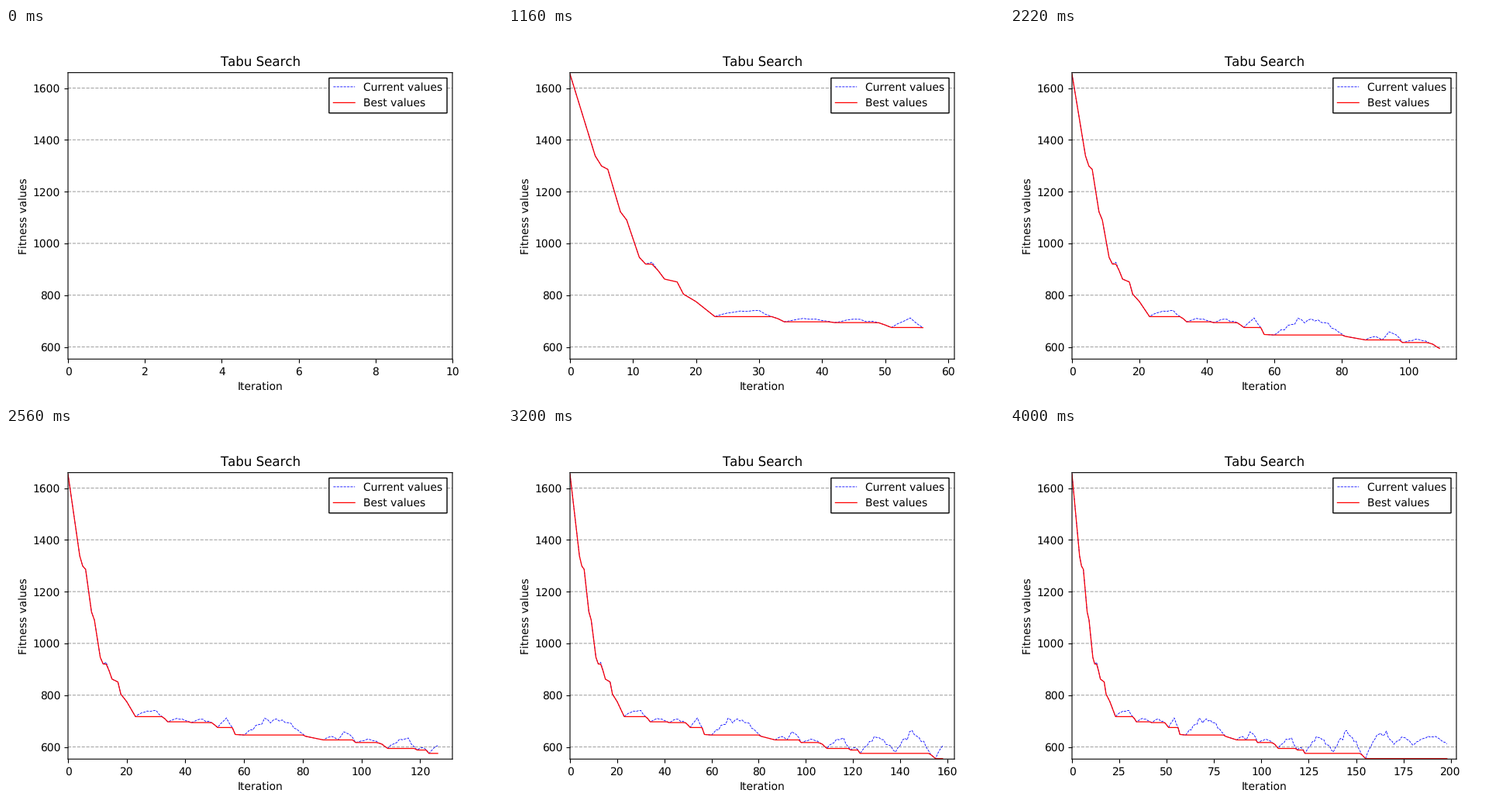
These frames come from a looping animation (640x480 px, 4.02 s). A matplotlib script:

```python
import numpy as np
import matplotlib.pyplot as plt
from matplotlib.animation import FuncAnimation

FRAMES, STEP_MS, HOLD = 201, 20, 2

# Steep opening: bends of the curve (iteration, fitness)
descent = [(0, 1654), (4, 1338), (5, 1299), (6, 1286), (8, 1122), (9, 1090),
           (11, 946), (12, 920), (13, 927), (15, 862), (17, 851), (18, 804),
           (20, 775)]

# Local optima: (iteration, fitness, climb before the next optimum)
optima = [(23, 717, 34), (34, 697, 14), (42, 694, 22), (51, 675, 44),
          (57, 648, 0), (60, 646, 60), (81, 641, 0), (87, 627, 12),
          (92, 627, 33), (98, 617, 20), (109, 594, 42), (119, 588, 16),
          (123, 575, 58), (138, 580, 74), (153, 570, 0), (155, 555, 72),
          (170, 610, 28), (180, 607, 30), (198, 612, 0)]


def search_path(iters):
    """Fall from optimum to optimum, with a noisy climb in between."""
    rng = np.random.default_rng(7)
    xs, ys = zip(*descent, *(o[:2] for o in optima))
    path = np.interp(iters, xs, ys)
    for (start, _, climb), (end, *_) in zip(optima, optima[1:]):
        arch = np.sin(np.pi * np.linspace(0, 1, end - start + 1))
        noise = rng.normal(0, 0.14, arch.size)
        path[start:end + 1] += climb * arch * (1 + noise)
    return path


iters = np.arange(FRAMES - HOLD)
current = search_path(iters)
best = np.minimum.accumulate(current)

plt.rcParams.update({
    "font.family": "DejaVu Sans",
    "text.hinting": "none",
    "text.kerning_factor": 6,
    "path.snap": False,
})
fig, ax = plt.subplots(figsize=(6.4, 4.8), dpi=100)
ax.set(title="Tabu Search", xlabel="Iteration", ylabel="Fitness values",
       xlim=(0, 10), ylim=(553, 1659.6))
ax.grid(axis="y", color="gray", alpha=0.7, linestyle="--", linewidth=0.8)
current_line, = ax.plot([], [], "b--", linewidth=0.6, label="Current values")
best_line, = ax.plot([], [], "r-", linewidth=0.9, label="Best values")
ax.legend(loc="upper right", fancybox=False, edgecolor="black", framealpha=1)


def update(frame):
    last = max(0, frame - HOLD)
    shown = slice(0, last + 1)
    current_line.set_data(iters[shown], current[shown])
    best_line.set_data(iters[shown], best[shown])
    ax.set_xlim(0, max(10, last + 5))
    return current_line, best_line


anim = FuncAnimation(fig, update, frames=FRAMES, interval=STEP_MS,
                     init_func=lambda: update(0), repeat=True, repeat_delay=0)
plt.show()
```
